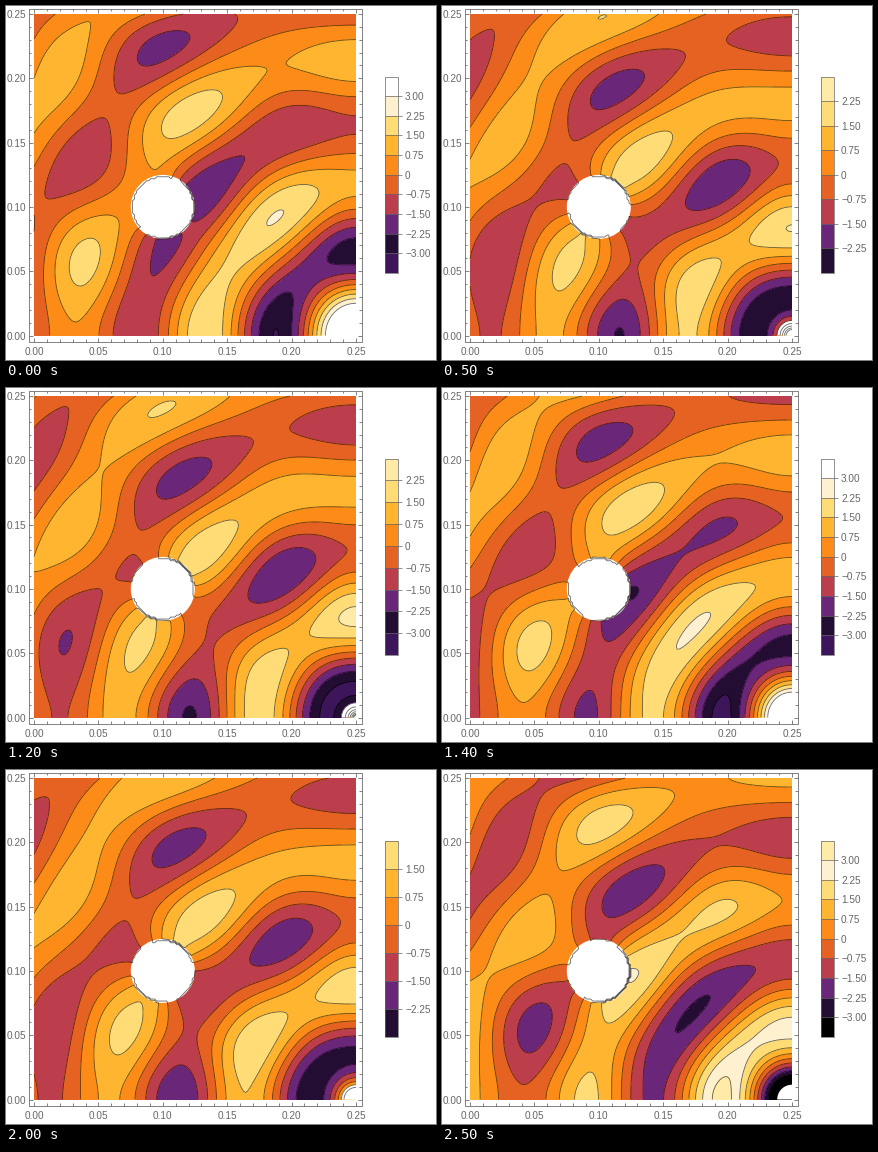
A matplotlib script for the animation above (2.6 s loop, 430 by 354 pixels).

```python
import numpy as np
import matplotlib.pyplot as plt
from matplotlib.animation import FuncAnimation
from matplotlib.patches import Circle, Rectangle

W, H, DPI = 430, 354, 100
FRAMES, INTERVAL = 26, 100
FRAMES_PER_PERIOD = 7.35
SIDE, N = 0.25, 160
WAVENUMBER, AMPLITUDE = 62.0, 5.15
DISK_X = DISK_Y = 0.1
DISK_R, EMITTER_R = 0.025, 0.0115
STEP, CLIP = 0.75, 3.7
GRAY = "#666666"

GRADIENT = [(-3.375, "000000"), (-2.625, "240d32"), (-2.4, "3d155a"),
            (-1.875, "6a2679"), (-1.125, "bc3d4b"), (-0.375, "e66223"),
            (0.375, "fc8b17"), (1.125, "ffb52f"), (1.875, "ffdc75"),
            (2.4, "ffeaa8"), (2.625, "fff1cf"), (3.375, "ffffff")]
STOPS = [v for v, _ in GRADIENT]
CHANNELS = np.array([[int(c[i:i + 2], 16) / 255 for i in (0, 2, 4)]
                     for _, c in GRADIENT]).T


def px(x):
    return 28 + x * 1288


def py(y):
    return 329.5 - y * 1286


def open_fraction(x, y, dx, dy):
    """Share of a face or cell of size dx by dy that lies outside the disk."""
    offsets = (np.arange(9) - 4) / 9
    xs = offsets * dx if dx else [0]
    ys = offsets * dy if dy else [0]
    return np.mean([np.hypot(x + a - DISK_X, y + b - DISK_Y) > DISK_R
                    for a in xs for b in ys], axis=0)


def solve_helmholtz():
    """Corner emitter, rigid disk, mirrors right and below, absorbing left and top."""
    h = SIDE / N
    grid = np.linspace(0, SIDE, N + 1)
    x, y = np.meshgrid(grid, grid, indexing="ij")
    half = np.ones(N + 1)
    half[[0, -1]] = 0.5
    east = open_fraction(x[:-1] + h / 2, y[:-1], 0, h) * half
    north = open_fraction(x[:, :-1], y[:, :-1] + h / 2, h, 0) * half[:, None]
    volume = open_fraction(x, y, h, h) * np.outer(half, half)

    diag = (WAVENUMBER * h) ** 2 * volume.astype(complex)
    diag[:-1] -= east
    diag[1:] -= east
    diag[:, :-1] -= north
    diag[:, 1:] -= north
    diag[0] += 1j * WAVENUMBER * h * half
    diag[:, -1] += 1j * WAVENUMBER * h * half
    diag[diag == 0] = 1

    # Block elimination, column by column, towards the emitter.
    inverses = []
    for i in range(N + 1):
        block = np.diag(diag[i]) + np.diag(north[i], 1) + np.diag(north[i], -1)
        if i:
            block -= east[i - 1][:, None] * inverses[-1] * east[i - 1]
        inverses.append(np.linalg.inv(block))
    u = np.zeros((N + 1, N + 1), complex)
    u[N] = inverses[N][:, 0] * 1j * AMPLITUDE
    for i in range(N, 0, -1):
        u[i - 1] = -inverses[i - 1] @ (east[i - 1] * u[i])
    return x, y, u


X, Y, WAVE = solve_helmholtz()
VISIBLE = ((np.hypot(X - SIDE, Y) > EMITTER_R)
           & (np.hypot(X - DISK_X, Y - DISK_Y) > DISK_R))

fig = plt.figure(figsize=(W / DPI, H / DPI), dpi=DPI, facecolor="white")
ax = fig.add_axes([0, 0, 1, 1])


def line(xs, ys, width=0.8):
    ax.plot(xs, ys, color=GRAY, lw=width * 0.72, solid_capstyle="butt")


def label(x, y, text, align):
    ax.text(x, y, text, ha=align, va="center_baseline", color=GRAY,
            family="Liberation Sans", fontsize=10 * 0.72)


def draw_axes():
    left, right, top, bottom = 22.5, 355.5, 2.5, 335.5
    line([left, right, right, left, left], [top, top, bottom, bottom, top])
    for i in range(26):
        major = i % 5 == 0
        size = 4 if major else 2.5
        x, y = px(i / 100), py(i / 100)
        line([x, x], [bottom, bottom - size])
        line([x, x], [top, top + size])
        line([left, left + size], [y, y])
        line([right, right - size], [y, y])
        if major:
            label(x, 345, f"{i / 100:.2f}", "center")
            label(20, y, f"{i / 100:.2f}", "right")


def draw_legend(levels, colors):
    x0, x1, top, bottom = 378.5, 391.5, 70.5, 267
    size = (bottom - top) / len(colors)
    for i, color in enumerate(colors):
        y = bottom - i * size
        ax.add_patch(Rectangle((x0, y - size), x1 - x0, size, fc=color, lw=0))
    for i, level in enumerate(levels):
        y = bottom - (i + 1) * size
        line([x0, x1 + 4], [y, y], 0.7)
        text = f"{level:.2f}".replace("-", "\u2212") if level else "0"
        label(399, y, text, "left")
    line([x0, x1, x1, x0, x0], [top, top, bottom, bottom, top], 0.7)


def band_colors(levels, low, high):
    """Shade per band; an outer band that is only just entered is milder."""
    mids = np.array([levels[0] - STEP, *levels]) + STEP / 2
    if levels[0] - low < 0.4:
        mids[0] = max(mids[0], -2.4)
    if high - levels[-1] < 0.4:
        mids[-1] = min(mids[-1], 2.4)
    return np.array([np.interp(mids, STOPS, c) for c in CHANNELS]).T


def draw(frame):
    ax.clear()
    ax.set(xlim=(0, W), ylim=(H, 0))
    ax.axis("off")
    phase = 2 * np.pi * frame / FRAMES_PER_PERIOD
    field = (WAVE * np.exp(-1j * phase)).real
    low = max(field[VISIBLE].min(), -CLIP)
    high = min(field[VISIBLE].max(), CLIP)
    levels = [i * STEP for i in range(-4, 5) if low < i * STEP < high]
    colors = band_colors(levels, low, high)

    ax.contourf(px(X), py(Y), field, levels=[-99, *levels, 99], colors=colors)
    ax.contour(px(X), py(Y), field, levels=levels, colors="black",
               linestyles="solid", linewidths=0.6, alpha=0.6)
    ax.add_patch(Circle((px(DISK_X), py(DISK_Y)), 32, fc="white", lw=0))
    angle = np.linspace(np.pi / 2, np.pi, 40)
    ax.fill([px(SIDE), *px(SIDE + EMITTER_R * np.cos(angle))],
            [py(0), *py(EMITTER_R * np.sin(angle))], color="white", lw=0)
    draw_axes()
    draw_legend(levels, colors)


anim = FuncAnimation(fig, draw, frames=FRAMES, interval=INTERVAL,
                     init_func=lambda: None, repeat=True, repeat_delay=0)
plt.show()
```
